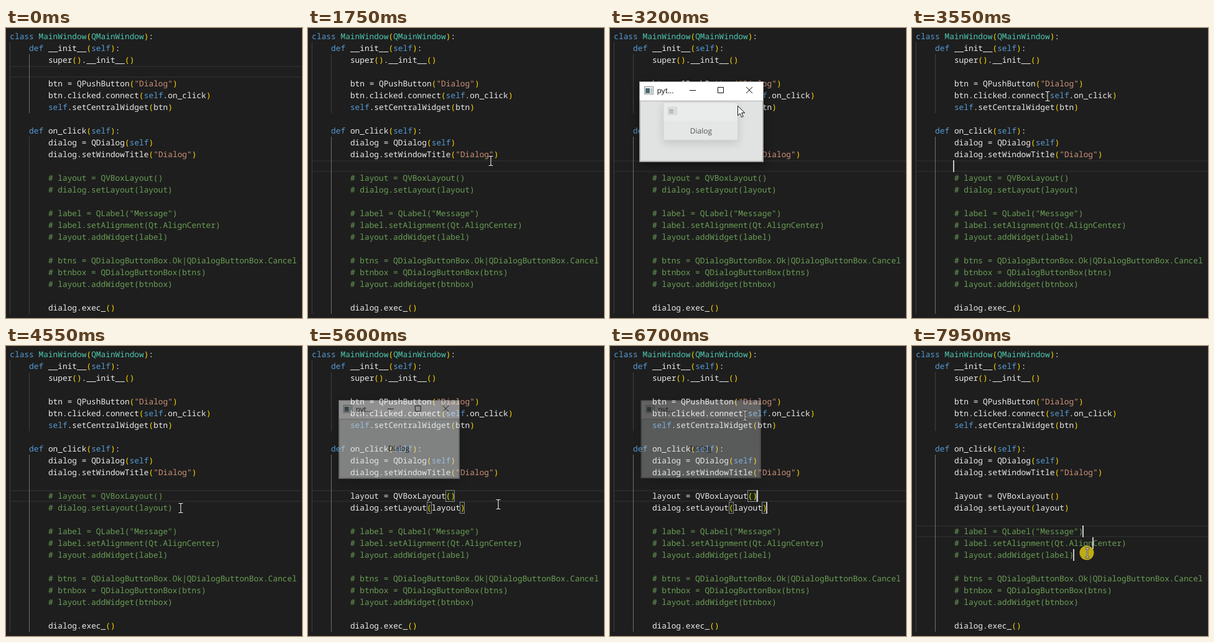
An HTML page that plays this animation: 476 by 467 pixels, repeating every 8000 ms.

```html
<!DOCTYPE html>
<html lang="en">
<head>
<meta charset="utf-8">
<title>Dialog demo</title>
<style>
  html, body { margin: 0; width: 100%; height: 100%; overflow: hidden; background: #1e1e1e; }
  svg { display: block; width: 100%; height: 100%; text-rendering: geometricPrecision; }
  .code { font: 500 12.828px "Noto Sans Mono", "DejaVu Sans Mono", monospace; white-space: pre; }
  .ui { font: 12px "Open Sans", "Noto Sans", sans-serif; fill: #111; }
  .window { filter: drop-shadow(0 5px 7px rgba(0, 0, 0, .4)); }
</style>
</head>
<body>
<svg id="stage" viewBox="0 0 476 467"></svg>
<script>
const LOOP = 8000, STEP = 50, BLINK = 300;
const LEFT = 6.3, CHAR = 7.697, TOP = 4, ROW = 19;
const colX = col => LEFT + col * CHAR;
const rowY = row => TOP + row * ROW;

const COLORS = {
  plain: '#ececec', keyword: '#569cd6', type: '#4ec9b0',
  string: '#ce9178', bracket: '#ffd700', comment: '#6a9f55'
};

const SOURCE = `class MainWindow(QMainWindow):
    def __init__(self):
        super().__init__()

        btn = QPushButton("Dialog")
        btn.clicked.connect(self.on_click)
        self.setCentralWidget(btn)

    def on_click(self):
        dialog = QDialog(self)
        dialog.setWindowTitle("Dialog")

        # layout = QVBoxLayout()
        # dialog.setLayout(layout)

        # label = QLabel("Message")
        # label.setAlignment(Qt.AlignCenter)
        # layout.addWidget(label)

        # btns = QDialogButtonBox.Ok|QDialogButtonBox.Cancel
        # btnbox = QDialogButtonBox(btns)
        # layout.addWidget(btnbox)

        dialog.exec_()`.split('\n');

// The story: pointer moves, clicks in the editor, runs of the program
const UNCOMMENT = 4700;
const isEdited = row => SOURCE[row].includes('ayout') && row < 15;
const moves = [], presses = [], clicks = [], runs = [];

function move(at, x, y, travel = 200) {
  moves.push({ at, x, y, travel });
}

function press(at, x, y, travel) {
  move(at, x, y, travel);
  presses.push(at);
}

// Puts a caret at the end of the row, or next to the caret already there
function editorClick(at, x, y, { travel, extra = false } = {}) {
  press(at, x, y, travel);
  const row = Math.floor((y - TOP) / ROW);
  const end = Math.max(8, SOURCE[row].length);
  clicks.push({ at, row, extra, col: Math.min(end, Math.round((x - LEFT) / CHAR)) });
}

// Press the button, close the dialog, close the main window
function run(open, begin) {
  press(begin + 300, 166, 160, 250);
  press(begin + 700, 202, 133, 300);
  press(begin + 1000, 215, 104, 150);
  runs.push({ open, close: begin + 1100, dialog: { open: begin + 400, close: begin + 850 } });
}

move(100, 364, 300, 0);
editorClick(850, 294, 214, { travel: 700 });
run(1950, 2300);
move(3900, 275, 250, 400);
editorClick(4050, 278, 245, { travel: 100 });
editorClick(4250, 281, 261, { travel: 100, extra: true });
move(5600, 306, 255, 100);
run(5550, 5550);
move(7100, 272, 337, 450);
editorClick(7450, 325, 298);
editorClick(7650, 291, 318, { travel: 150, extra: true });
editorClick(7850, 282, 333, { travel: 150, extra: true });

const dialogs = runs.map(r => r.dialog);
const blinkStarts = [...clicks.map(c => c.at), ...runs.map(r => r.close + STEP), UNCOMMENT + STEP];
const isOpen = (t, spans) => spans.some(s => t >= s.open && t < s.close);
const show = (node, on) => node.setAttribute('visibility', on ? 'inherit' : 'hidden');

function el(parent, name, attrs = {}, text) {
  const node = document.createElementNS('http://www.w3.org/2000/svg', name);
  for (const key in attrs) node.setAttribute(key, attrs[key]);
  if (text !== undefined) node.textContent = text;
  return parent.appendChild(node);
}

const rect = (parent, x, y, width, height, fill, more) =>
  el(parent, 'rect', { x, y, width, height, fill, ...more });

function tokenKind(token, row) {
  if (token[0] === '#') return 'comment';
  if (token[0] === '"') return 'string';
  if (/^[()]$/.test(token)) return 'bracket';
  if (/^(class|def|self)$/.test(token)) return 'keyword';
  return row === 0 && /^\w/.test(token) ? 'type' : 'plain';
}

function drawCode(parent, line, row, forced) {
  const text = el(parent, 'text', { class: 'code', y: rowY(row) + 14 });
  for (const m of line.matchAll(/#.*|"[^"]*"|\w+|[()]|[^\s\w()"#]+/g)) {
    el(text, 'tspan', { x: colX(m.index), fill: COLORS[forced || tokenKind(m[0], row)] }, m[0]);
  }
}

const stage = document.getElementById('stage');
rect(stage, 0, 0, 476, 467, '#1e1e1e');

const lineMark = el(stage, 'g');
rect(lineMark, 6, 0, 470, 2, '#292929');
rect(lineMark, 6, ROW - 2, 470, 2, '#292929');
const guide = (x, from, to) => rect(stage, x, rowY(from), 1, (to - from) * ROW, '#404040');
guide(6, 1, 24);
const upperGuide = guide(37, 2, 7);
const lowerGuide = guide(37, 9, 24);

// Edited lines have a commented, a shifted and a coloured state
const brackets = el(stage, 'g');
const states = ['commented', 'shifted', 'coloured'].map(() => el(stage, 'g'));
SOURCE.forEach((line, row) => {
  if (!isEdited(row)) return drawCode(stage, line, row);
  const bare = line.replace('# ', '');
  drawCode(states[0], line, row);
  drawCode(states[1], bare, row, 'comment');
  drawCode(states[2], bare, row);
  for (const m of bare.matchAll(/\(\)|[()]/g)) {
    el(brackets, 'rect', {
      x: Math.floor(colX(m.index)) + .5, y: rowY(row) + .5,
      width: Math.round(m[0].length * CHAR) - 1, height: ROW - 1,
      fill: 'rgba(0,100,0,.1)', stroke: '#888'
    });
  }
});

for (const click of clicks) click.caret = rect(stage, 0, rowY(click.row), 2, ROW, '#c8c8c8');

function makeWindow(x, y, w, h) {
  const group = el(stage, 'g', { class: 'window' });
  rect(group, x, y, w, h, '#f0f0f0');
  rect(group, x, y, w, 31, '#fff');
  rect(group, x + .5, y + .5, w - 1, h - 1, 'none', { stroke: '#a0a0a0' });
  rect(group, x + 8.5, y + 8.5, 14, 12, '#f4f4f4', { stroke: '#8b9090' });
  rect(group, x + 10, y + 11, 7, 8, '#4b6a70');
  rect(group, x + 18, y + 11, 3, 8, '#b9c4c6');
  return { group, buttons: el(group, 'g') };
}

const glyph = (parent, d) => el(parent, 'path', { d, fill: 'none', stroke: '#111' });
const label = (parent, x, y, text) =>
  el(parent, 'text', { class: 'ui', x, y, 'text-anchor': 'middle' }, text);

const mainWin = makeWindow(47, 86, 200, 130);
rect(mainWin.group, 48.5, 117.5, 197, 97, '#e1e3e3', { stroke: '#adadad' });
label(mainWin.group, 89, 105, 'pyt...');
label(mainWin.group, 146.5, 170, 'Dialog');
glyph(mainWin.buttons, 'M128 100.5h10M173.5 95.5h9v9h-9zM219 95l10 10m0-10l-10 10');

const dialogWin = makeWindow(84, 119, 125, 64);
label(dialogWin.buttons, 140, 139, '?');
glyph(dialogWin.buttons, 'M181 130l10 10m0-10l-10 10');

function fade(t, spans) {
  for (const { open, close } of spans) {
    if (t >= open && t < close) return Math.min(1, .2 + .3 * (t - open) / STEP);
    if (t >= close && t < close + 2 * STEP) return .6 - .3 * (t - close) / STEP;
  }
  return 0;
}

function poseWindow(win, t, spans) {
  const opacity = fade(t, spans);
  show(win.group, opacity > 0);
  win.group.setAttribute('opacity', opacity);
  win.group.setAttribute('transform', `translate(${146 + opacity} ${150 + opacity}) ` +
    `scale(${.95 + .05 * opacity}) translate(-147 -151)`);
  show(win.buttons, isOpen(t, spans));
}

const pointer = el(stage, 'g');
const halo = el(pointer, 'circle', { r: 11.5, cx: -1, fill: '#dcc414', opacity: .85 });
const beam = el(pointer, 'g', { fill: 'none' });
const BEAM = 'M-3.5-7.5h2.5l1 1l1-1h2.5M0-6.5v13M-3.5 7.5h2.5l1-1l1 1h2.5';
el(beam, 'path', { d: BEAM, stroke: '#111', 'stroke-width': 2.4 });
el(beam, 'path', { d: BEAM, stroke: '#f4f4f4', 'stroke-width': 1.1 });
const arrow = el(pointer, 'path', {
  d: 'M.5.5v15.5l3.6-3.4l2.5 6l2.6-1.1l-2.5-5.8h5z', fill: '#fff', stroke: '#111'
});

function pointerAt(t) {
  let [x, y] = [moves[0].x, moves[0].y];
  for (const m of moves.slice(1)) {
    const u = Math.min(1, Math.max(0, (t - m.at + m.travel) / m.travel));
    const ease = u * u * (3 - 2 * u);
    x += (m.x - x) * ease;
    y += (m.y - y) * ease;
  }
  return [Math.round(x), Math.round(y)];
}

function poseEditor(t) {
  const main = clicks.filter(c => !c.extra && c.at <= t).pop();
  const row = main ? main.row : 3;
  lineMark.setAttribute('transform', `translate(0 ${rowY(row)})`);
  upperGuide.setAttribute('fill', row < 8 ? '#707070' : '#404040');
  lowerGuide.setAttribute('fill', row < 8 ? '#404040' : '#707070');

  const state = t < UNCOMMENT ? 0 : t < UNCOMMENT + STEP ? 1 : 2;
  states.forEach((group, i) => show(group, i === state));
  show(brackets, t >= UNCOMMENT + 5 * STEP && isEdited(row));

  const since = t - Math.max(...blinkStarts.filter(s => s <= t));
  const lit = !isOpen(t, runs) && Math.floor(since / BLINK) % 2 === 0;
  for (const { at, row, col, caret } of clicks) {
    const shift = state && isEdited(row) ? 2 : 0;
    caret.setAttribute('x', Math.floor(colX(col - shift) - .9));
    show(caret, lit && main && at >= main.at && at <= t);
  }
}

function render(time) {
  const t = Math.floor(time % LOOP / STEP) * STEP;
  poseEditor(t);
  poseWindow(mainWin, t, runs);
  poseWindow(dialogWin, t, dialogs);

  const [x, y] = pointerAt(t);
  const overWindow = isOpen(t, runs) && x > 47 && x < 247 && y > 86 && y < 216;
  pointer.setAttribute('transform', `translate(${x} ${y})`);
  show(pointer, t >= moves[0].at);
  show(halo, presses.some(at => t >= at && t < at + 3 * STEP));
  show(beam, !overWindow);
  show(arrow, overWindow);
}

// Row 11 holds only its indent, so its caret stays at the end of that
clicks[0].col = 8;

const start = performance.now();
function tick() {
  render(performance.now() - start);
  requestAnimationFrame(tick);
}
tick();
</script>
</body>
</html>
```
